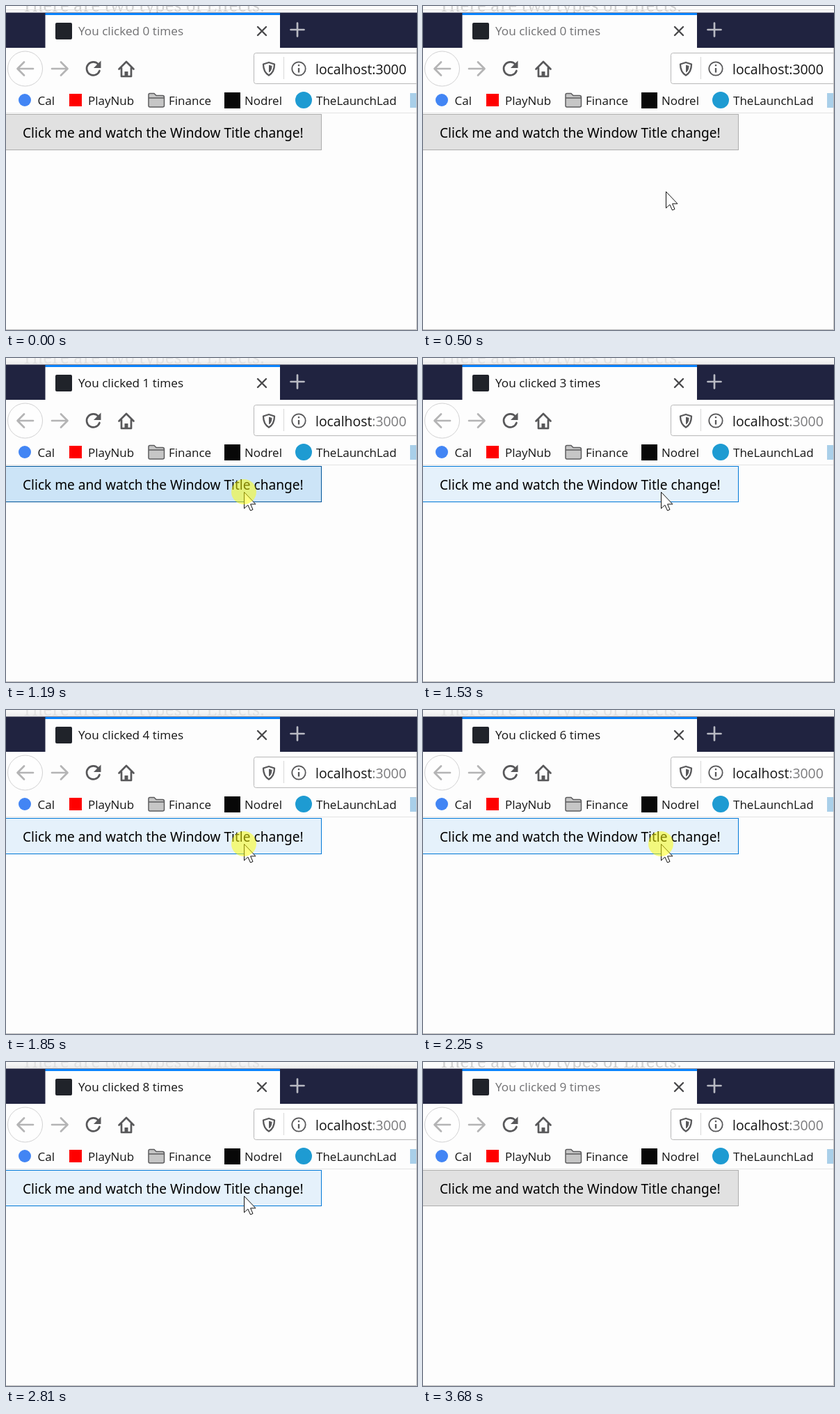
An HTML page that plays this animation: 591 by 465 pixels, repeating every 3.74 s.

```html
<!DOCTYPE html>
<html lang="en">
<head>
<meta charset="utf-8">
<title>Click counter</title>
<style>
  html, body { margin: 0; width: 100%; height: 100%; overflow: hidden; background: #fdfdfd; }
  svg { display: block; width: 591px; height: 465px; }
  text { font: 17px "Open Sans", "Noto Sans", sans-serif; fill: #151515; white-space: pre; }
  #backdrop text { font: 24.3px "Noto Serif", serif; fill: #d2d2d2; }
  #title { font-size: 17.2px; }
  #address { font-size: 19.4px; }
  #label { font: 19.1px "Noto Sans", sans-serif; fill: #000; }
  .line { fill: none; stroke: #58585a; stroke-width: 2.7; stroke-linecap: round; stroke-linejoin: round; }
  .off { stroke: #b4b4b5; }
</style>
</head>
<body>
<svg viewBox="0 0 591 465">
  <defs>
    <linearGradient id="shade" x2="0" y2="1">
      <stop offset="0" stop-color="#f6f6f6" stop-opacity=".5"/>
      <stop offset="1" stop-color="#e2e2e2" stop-opacity=".75"/>
    </linearGradient>
  </defs>

  <g id="backdrop">
    <rect width="591" height="10" fill="#fcfcfc"/>
    <text x="23" y="8">There are two types of Effects:</text>
    <path id="rule" d="M0 5.5H591" stroke="#e0e0e0"/>
    <rect id="shadow" width="591" height="10" fill="url(#shade)"/>
  </g>

  <!-- tab strip -->
  <rect y="10" width="591" height="455" fill="#fdfdfd"/>
  <path d="M0 9.500H591V60H394V13H56.500V60H0Z" fill="#202340"/>
  <rect x="56.500" y="10" width="337.500" height="3" fill="#0a84ff"/>
  <rect x="71" y="24" width="24" height="24" rx="2" fill="#20232a"/>
  <text id="title" x="104" y="42"></text>
  <path class="line" d="M362 30L374 42M374 30L362 42" style="stroke:#4a4a4c;stroke-width:2.4"/>
  <path class="line" d="M409.500 34H428.500M419 24.500V43.500" style="stroke:#b9bac3"/>

  <!-- navigation -->
  <circle cx="27.500" cy="90" r="25" fill="#fefefe" stroke="#d2d2d3"/>
  <path class="line off" d="M39 90H17M26 80.500L16.500 90L26 99.500"/>
  <path class="line off" d="M66 90H88M79 80.500L88.500 90L79 99.500"/>
  <path class="line" d="M133 84A9.500 9.500 0 1 0 134.500 93"/>
  <path d="M136.500 78.500V89H126Z" fill="#58585a"/>
  <path class="line" d="M162.500 90.500L173 80L183.500 90.500M166 89V101H180V89"/>
  <path d="M170.500 101V94H175.500V101Z" fill="#58585a"/>

  <!-- address bar -->
  <rect x="356.500" y="67.500" width="260" height="44" rx="3" fill="#fff" stroke="#b8b8b9"/>
  <path class="line" d="M378 81L386 83.500C386 91 384 96 378 99.500C372 96 370 91 370 83.500Z" style="stroke-width:2.300"/>
  <path d="M378 84.500L382.500 86C382.300 91 381 93.500 378 95.500Z" fill="#58585a"/>
  <path d="M399.500 73V105" stroke="#d8d8d9"/>
  <circle class="line" cx="421" cy="90" r="9.700" style="stroke-width:1.800"/>
  <path d="M421 89V95.500M421 84V86.300" stroke="#58585a" stroke-width="2.300"/>
  <text id="address" x="445" y="97.500">localhost<tspan id="port">:3000</tspan></text>

  <!-- bookmarks -->
  <circle cx="27" cy="135" r="9" fill="#4285f4"/>
  <text x="45.500" y="141.500">Cal</text>
  <rect x="91" y="126" width="18" height="18" fill="#f00"/>
  <text x="118" y="141.500">PlayNub</text>
  <path d="M205 143V127.500Q205 125.500 207 125.500H213L216 128.500H225Q227.500 128.500 227.500 131V143Q227.500 145 225 145H207Q205 145 205 143ZM205 132H227" fill="#c6c6c6" stroke="#5c5c5e" stroke-width="1.500"/>
  <text x="234" y="141.500">Finance</text>
  <rect x="314" y="124" width="23" height="23" fill="#080808"/>
  <text x="343" y="141.500">Nodrel</text>
  <circle cx="428" cy="135" r="12" fill="#1e9bd2"/>
  <text x="446" y="141.500">TheLaunchLad</text>
  <rect x="581" y="125" width="21" height="21" fill="#a9cfe9"/>
  <path d="M0 153.500H591" stroke="#e3e3e4"/>

  <!-- page -->
  <rect id="button" x="-3" y="155.500" width="456.500" height="51"/>
  <text id="label" x="24" y="189">Click me and watch the Window Title change!</text>
  <path d="M590.500 60V464.500H0" fill="none" stroke="#bdbdbe"/>
  <path id="cursor" d="M.5 .5V24L5.800 19L9.500 27L13 25.500L9.600 17.800H17Z" fill="#fff" stroke="#111"/>
  <circle id="highlight" cx="342" cy="192" r="18" fill="#ff0" opacity=".5"/>
</svg>

<script>
const LOOP = 3740, ACTIVATE = 1030, DEACTIVATE = 3680;

const pointer = [
  [0, 421, 480], [70, 421, 454], [140, 395, 415], [210, 373, 375], [280, 362, 345],
  [350, 357, 322], [420, 353, 298], [490, 349, 266], [560, 345, 237],
  [650, 344, 221], [720, 343, 203], [790, 342, 197], [860, 342, 192],
  [3130, 402, 288], [3210, 487, 404], [3290, 537, 459], [3350, 545, 480]
];

// [time, button look, highlight shown, click count]
const phases = [
  [0, "idle", 0, 0], [720, "hover", 0, 0],
  [1030, "press", 1, 0], [1110, "hover", 1, 1], [1190, "press", 1, 1],
  [1280, "hover", 1, 2], [1360, "press", 1, 2], [1450, "hover", 1, 3], [1530, "hover", 0, 3],
  [1700, "press", 1, 3], [1780, "hover", 1, 3], [1850, "hover", 1, 4], [1940, "hover", 0, 4],
  [2010, "press", 1, 4], [2090, "hover", 1, 5], [2170, "press", 1, 5],
  [2250, "hover", 1, 6], [2340, "hover", 0, 6], [2420, "press", 1, 6],
  [2490, "hover", 1, 7], [2570, "hover", 0, 7], [2650, "press", 1, 7],
  [2730, "hover", 1, 8], [2810, "hover", 0, 8], [2890, "press", 1, 8],
  [2970, "hover", 1, 9], [3050, "hover", 0, 9], [3130, "focus", 0, 9], [3680, "idle", 0, 9]
];

const looks = {
  idle: ["#e1e1e1", "#adadad", 1],
  hover: ["#e5f1fb", "#0078d7", 1],
  press: ["#cce4f7", "#005499", 1],
  focus: ["#e1e1e1", "#0078d7", 2]
};

const $ = id => document.getElementById(id);
const set = (id, attributes) => {
  for (const name in attributes) $(id).setAttribute(name, attributes[name]);
};
const show = (id, visible) => set(id, { visibility: visible ? "visible" : "hidden" });
const latest = (steps, t) => steps.findLast(step => step[0] <= t);

function draw() {
  const t = performance.now() % LOOP;
  const [, x, y] = latest(pointer, t);
  const [, look, highlighted, count] = latest(phases, t);
  const [fill, stroke, width] = looks[look];
  const active = t >= ACTIVATE && t < DEACTIVATE;

  set("cursor", { transform: `translate(${x} ${y})` });
  set("button", { fill, stroke, "stroke-width": width });
  show("highlight", highlighted);
  show("shadow", active);
  show("rule", t < ACTIVATE);
  $("title").textContent = `You clicked ${count} times`;
  $("title").style.fill = active ? "#151515" : "#707072";
  $("port").style.fill = t < ACTIVATE ? "#151515" : "#7b7b7d";
  requestAnimationFrame(draw);
}
draw();
</script>
</body>
</html>
```
